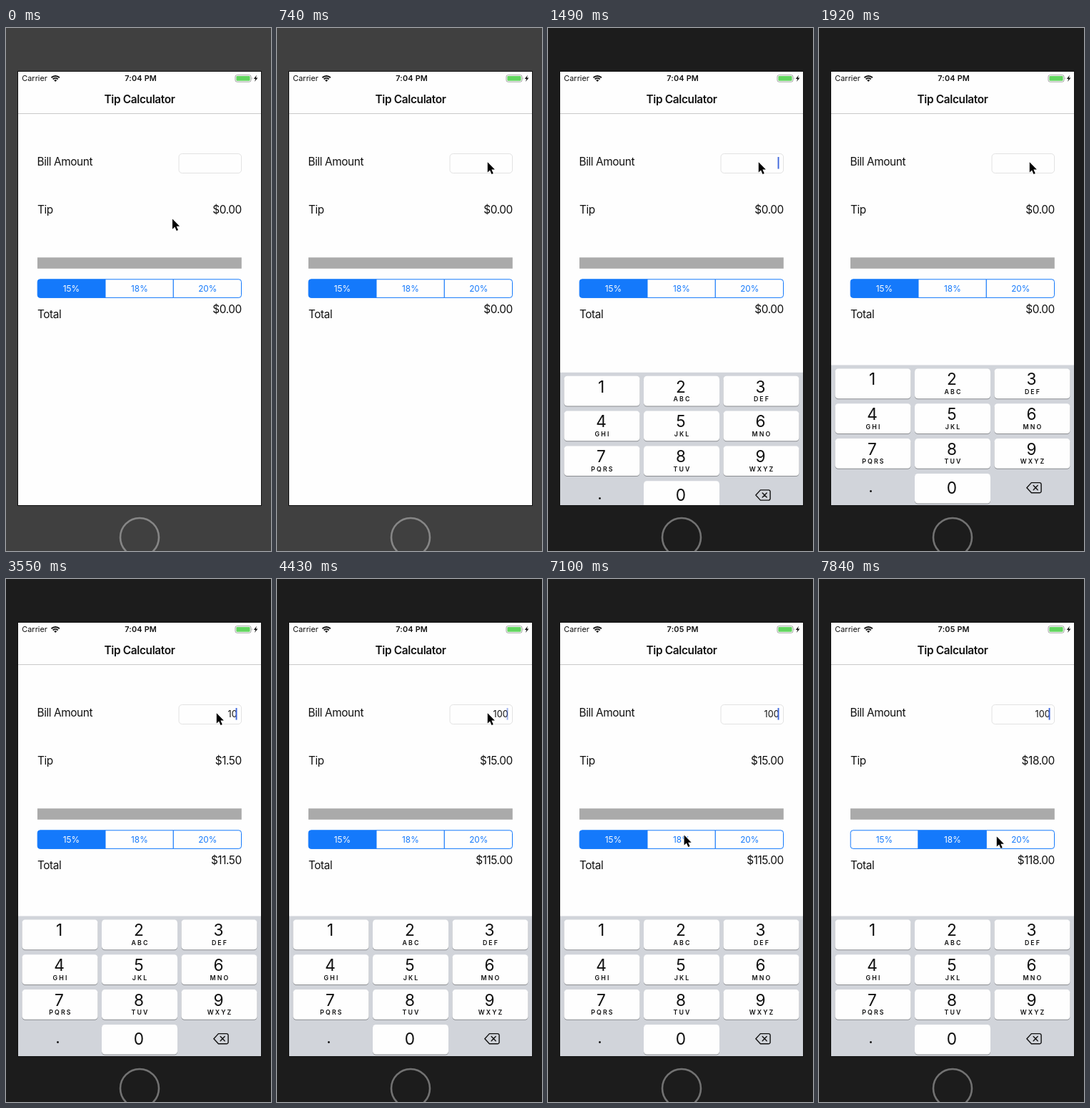
Animation of 371x730 px, one loop 7990 ms. Source, as an HTML page:

```html
<!DOCTYPE html>
<html lang="en">
<head>
<meta charset="utf-8">
<title>Tip Calculator</title>
<style>
  html, body { margin: 0; width: 100%; height: 100%; overflow: hidden; background: #1c1c1c; }
  svg { display: block; width: 371px; height: 730px; font-family: Inter, Roboto, sans-serif; fill: #111; }
  .label { font-size: 15.4px; letter-spacing: -.028em; }
  .title { font-size: 15.4px; font-weight: 600; letter-spacing: -.022em; }
  .status { font-size: 10.9px; }
  .bold { font-weight: 600; letter-spacing: .015em; }
  .bill { font-size: 12.7px; }
  .segment { font-size: 11.8px; }
  .digit { font-size: 22.7px; }
  .letters { font-size: 8.8px; font-weight: 600; letter-spacing: 2.1px; }
  .middle { text-anchor: middle; }
  .end { text-anchor: end; }
</style>
</head>
<body>
<svg id="stage" viewBox="0 0 371 730">
  <defs><clipPath id="screen"><rect x="17" y="61" width="340" height="605"/></clipPath></defs>
  <rect id="bezel" width="371" height="730"/>
  <circle id="home" cx="187" cy="711" r="27" fill="none" stroke-width="2.6"/>
  <rect x="16" y="60" width="342" height="607" fill="#111"/>
  <rect x="17" y="61" width="340" height="605" fill="#fefefe"/>

  <text class="status" x="22.3" y="74.3">Carrier</text>
  <g fill="none" stroke="#111" stroke-width="1.9">
    <path d="M63.5 69.2a8.3 8.3 0 0 1 11.4 0M65.7 71.5a5 5 0 0 1 7 0"/>
    <path d="M67.2 72.9L69.2 75l2-2.1a2.9 2.9 0 0 0-4 0z" fill="#111" stroke="none"/>
  </g>
  <text id="clock" class="status bold middle" x="188.7" y="74.3"></text>
  <rect x="321" y="65.6" width="22" height="9.6" rx="2.4" fill="#fefefe" stroke="#999" stroke-width=".9"/>
  <rect x="322.4" y="67" width="19.2" height="6.8" rx="1.1" fill="#62d65f"/>
  <path d="M344.2 68.8q1.5 1.6 0 3.2z" fill="#999"/>
  <path d="M351 65.8l-4.2 5.2h2.5l-1.2 4 4.3-5.4h-2.6z"/>

  <text class="title middle" x="187" y="105">Tip Calculator</text>
  <rect x="17" y="119" width="340" height="1" fill="#cacaca"/>

  <text class="label" x="43.6" y="192">Bill Amount</text>
  <text class="label" x="44" y="258.7">Tip</text>
  <text class="label" x="44" y="404.5">Total</text>
  <rect x="242" y="175.5" width="87.6" height="27" rx="4.5" fill="#fefefe" stroke="#e2e2e2"/>
  <text id="bill" class="bill end" x="323.7" y="193.3"></text>
  <rect id="caret" x="321.6" y="180" width="1.9" height="16.6" fill="#4067dc"/>
  <text id="tip" class="label end" x="329.8" y="259.4"></text>
  <text id="total" class="label end" x="329.8" y="398.4"></text>
  <rect x="44" y="320.3" width="285.8" height="15.5" fill="#aaa"/>
  <g id="segments"></g>

  <g clip-path="url(#screen)"><g id="keyboard">
    <rect x="17" y="470.5" width="340" height="196" fill="#d1d4da"/>
  </g></g>

  <path id="pointer" d="M0 0V14.2L3.3 11.1 5.7 16.6 8 15.6 5.6 10.3H10.1Z"
        fill="#000" stroke="#fff" stroke-width="1.3" paint-order="stroke" stroke-linejoin="round"/>
</svg>
<script>
const LOOP = 7990;
const RATES = [15, 18, 20];
const BLUE = '#1479fb';
const $ = id => document.getElementById(id);

function add(parent, tag, attrs, text = '') {
  const node = document.createElementNS('http://www.w3.org/2000/svg', tag);
  for (const name in attrs) node.setAttribute(name, attrs[name]);
  node.textContent = text;
  return parent.appendChild(node);
}

// Segmented control
const segmentPaths = [
  'M139 350.8H47.8a3.6 3.6 0 0 0-3.6 3.6v18.4a3.6 3.6 0 0 0 3.6 3.6H139z',
  'M139 350.8h95.3v25.6H139z',
  'M234.3 350.8h91.6a3.6 3.6 0 0 1 3.6 3.6v18.4a3.6 3.6 0 0 1-3.6 3.6h-91.6z'
];
const segments = RATES.map((rate, i) => ({
  rate,
  box: add($('segments'), 'path', { d: segmentPaths[i], stroke: BLUE }),
  text: add($('segments'), 'text', { class: 'segment middle', x: 91.5 + 95.4 * i, y: 367.9 }, rate + '%')
}));

// Number pad
const letters = ['', 'ABC', 'DEF', 'GHI', 'JKL', 'MNO', 'PQRS', 'TUV', 'WXYZ'];
function addKey(digit, column, row) {
  const x = 22.5 + 111.5 * column, y = 475.5 + 48.8 * row, center = x + 53;
  const pad = $('keyboard');
  add(pad, 'rect', { x, y: y + 1, width: 106, height: 41.7, rx: 4.5, fill: '#8b8d91' });
  add(pad, 'rect', { x, y, width: 106, height: 41.7, rx: 4.5, fill: '#fefefe' });
  add(pad, 'text', { class: 'digit middle', x: center - 1, y: y + (digit ? 22.8 : 28.3) }, digit);
  if (digit) add(pad, 'text', { class: 'letters middle', x: center + 1, y: y + 35.3 }, letters[digit - 1]);
}
for (let i = 0; i < 9; i++) addKey(i + 1, i % 3, Math.floor(i / 3));
addKey(0, 1, 3);
add($('keyboard'), 'text', { class: 'digit middle', x: 72.5, y: 647.5 }, '.');
add($('keyboard'), 'path', {
  d: 'M297.4 634.6h11.4a2.3 2.3 0 0 1 2.3 2.3v9.6a2.3 2.3 0 0 1-2.3 2.3h-11.4l-6.5-7.1zM300.2 638.6l6 6.2m0-6.2l-6 6.2',
  fill: 'none', stroke: '#111', 'stroke-width': 1.4, 'stroke-linejoin': 'round', 'stroke-linecap': 'round'
});

// Each step holds only what changes at that time.
const steps = [
  [0, { active: false, at: [233, 266.5], slide: 200, caret: 0, bill: '', clock: '7:04 PM', rate: 15 }],
  [150, { at: [250, 305] }],
  [300, { at: [276, 314] }],
  [440, { at: [301, 262] }],
  [590, { at: [302, 196] }],
  [740, { at: [294.8, 187.3] }],
  [1040, { active: true }],
  [1340, { slide: 90, caret: .5 }],
  [1490, { slide: 10.3, caret: 1 }],
  [1630, { slide: 1 }],
  [1780, { slide: 0, caret: .5 }],
  [1920, { caret: 0 }],
  [2220, { caret: .5 }],
  [2370, { caret: 1 }],
  [2810, { caret: .5 }],
  [2960, { caret: 0 }],
  [3260, { caret: .5 }],
  [3410, { caret: 1, bill: '1' }],
  [3550, { bill: '10' }],
  [3840, { bill: '100' }],
  [4290, { caret: .5 }],
  [4440, { caret: 0 }],
  [4580, { clock: '7:05 PM' }],
  [4880, { caret: 1 }],
  [5470, { caret: 0 }],
  [5910, { caret: 1 }],
  [6360, { caret: .5 }],
  [6510, { caret: 0, at: [285, 222] }],
  [6650, { at: [254, 296] }],
  [6800, { at: [220, 348] }],
  [6950, { caret: 1, at: [197, 361] }],
  [7100, { at: [190.6, 357.4] }],
  [7400, { rate: 18 }],
  [7550, { caret: 0 }],
  [7690, { at: [216, 359] }],
  [7840, { caret: 1, at: [248.8, 359.4] }]
];

const money = value => '$' + value.toFixed(2);

function draw(time) {
  const s = Object.assign({}, ...steps.filter(([start]) => start <= time).map(([, change]) => change));
  const tip = s.bill * s.rate / 100;
  $('bezel').setAttribute('fill', s.active ? '#1c1c1c' : '#404040');
  $('home').setAttribute('stroke', s.active ? '#727272' : '#868686');
  $('pointer').setAttribute('transform', `translate(${s.at})`);
  $('keyboard').setAttribute('transform', `translate(0 ${s.slide})`);
  $('caret').setAttribute('opacity', s.caret);
  $('clock').textContent = s.clock;
  $('bill').textContent = s.bill;
  $('tip').textContent = money(tip);
  $('total').textContent = money(Number(s.bill) + tip);
  for (const { rate, box, text } of segments) {
    const chosen = rate === s.rate;
    box.setAttribute('fill', chosen ? BLUE : '#fefefe');
    text.setAttribute('fill', chosen ? '#fefefe' : BLUE);
  }
}

const begin = performance.now();
function tick() {
  draw((performance.now() - begin) % LOOP);
  requestAnimationFrame(tick);
}
tick();
</script>
</body>
</html>
```
